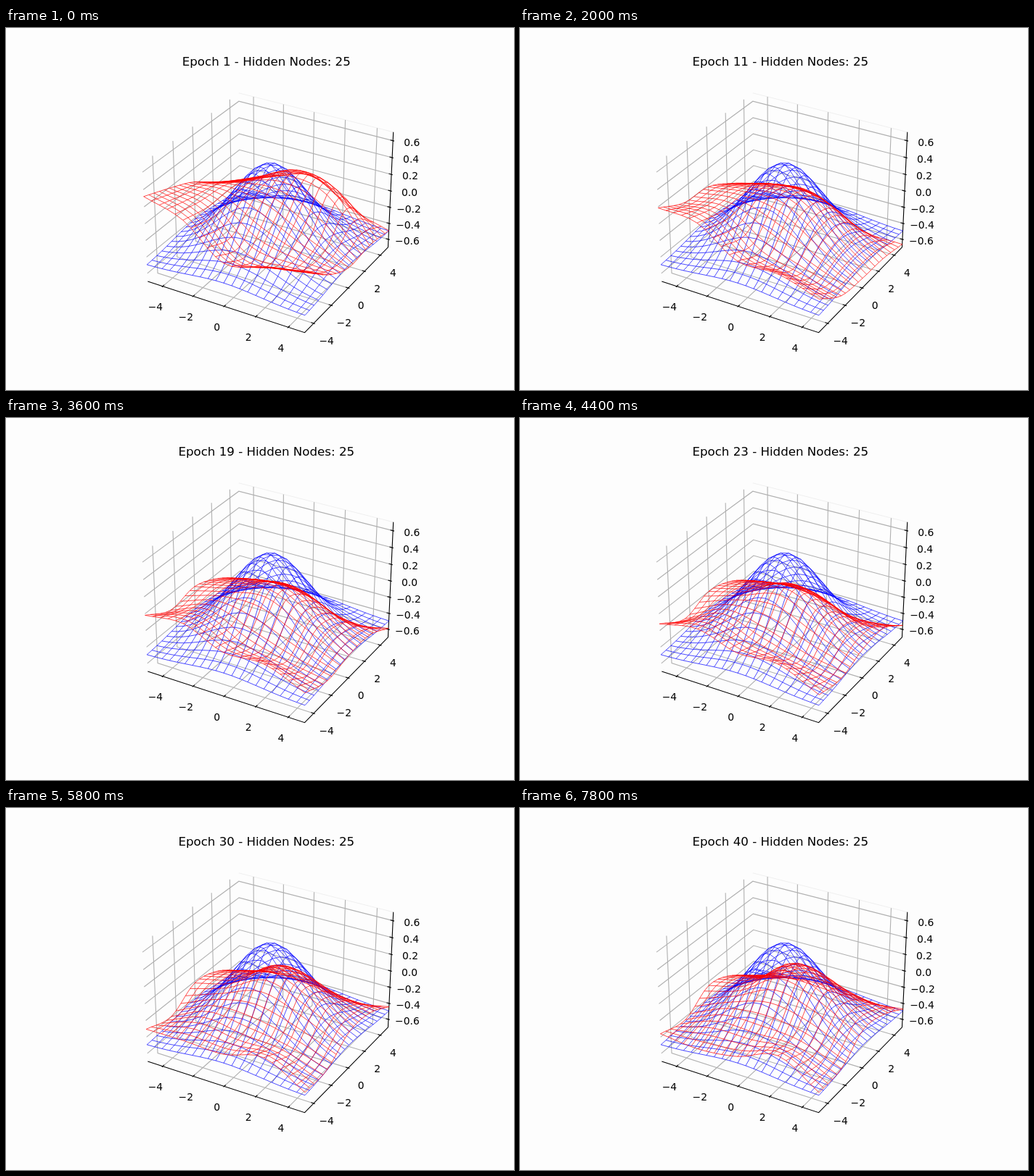
Recreate the animation shown at these times as an HTML page with a canvas. Size 700x500 px, loop 8 s.

```html
<!DOCTYPE html>
<html lang="en">
<head>
<meta charset="utf-8">
<title>Surface fit</title>
<style>
  html, body { margin: 0; width: 100%; height: 100%; overflow: hidden; background: #fdfdfd; }
  canvas { display: block; width: 700px; height: 500px; }
</style>
</head>
<body>
<canvas id="stage" width="700" height="500"></canvas>
<script>
const ctx = document.getElementById('stage').getContext('2d');
const EPOCH_MS = 200, EPOCHS = 40;
const LIM = 5, ZLIM = 0.7, CELLS = 20;
const FONT = '"DejaVu Sans", sans-serif';

// Fitted surface heights on a 5 x 5 lattice: rows y = -5..5, columns x = -5..5.
const keys = [
  { epoch: 1, heights: [
    [.32, .18, -.18, -.08, .02], [.19, .1, -.33, -.33, -.28], [.04, .1, 0, -.25, -.45],
    [-.2, 0, .2, .12, -.43], [-.41, -.21, -.08, -.35, -.49]] },
  { epoch: 7, heights: [
    [.29, .21, -.15, -.16, -.28], [.12, .1, -.3, -.43, -.56], [.04, .09, .02, -.32, -.66],
    [-.17, -.05, 0, -.28, -.68], [-.4, -.29, -.36, -.62, -.7]] },
  { epoch: 23, heights: [
    [-.12, -.04, -.18, -.16, -.37], [-.3, -.1, -.24, -.37, -.44], [-.2, -.07, .11, -.1, -.34],
    [-.3, -.19, -.13, -.3, -.34], [-.52, -.46, -.53, -.69, -.55]] },
  { epoch: 34, heights: [
    [-.41, -.45, -.39, -.23, -.51], [-.45, -.25, -.24, -.28, -.46], [-.23, -.1, .22, .07, -.21],
    [-.3, -.16, .08, -.08, -.24], [-.53, -.4, -.41, -.43, -.38]] }
];
// In the last epochs the surface tilts: the front rises, the back sinks.
keys.push({
  epoch: EPOCHS,
  heights: keys[keys.length - 1].heights.map((row, j) => row.map(z => z + 0.05 - 0.035 * j))
});

const mix = (a, b, t) => a + (b - a) * t;

// Perspective camera: elevation 30, azimuth -60, distance 10.
function project(x, y, z) {
  const X = x * 0.119048, Y = y * 0.119048, Z = z * 0.637755;
  const depth = 10 - (0.4330 * X - 0.75 * Y + 0.5 * Z);
  const scale = 2081.08 / depth;
  return {
    x: 363.95 + scale * (0.8660 * X + 0.5 * Y),
    y: 247.3 - scale * (-0.25 * X + 0.4330 * Y + 0.8660 * Z),
    depth
  };
}

// Catmull-Rom through evenly spaced values, u from 0 to 1.
function spline(v, u) {
  const last = v.length - 1;
  const i = Math.min(Math.floor(u * last), last - 1), t = u * last - i;
  const p1 = v[i], p2 = v[i + 1];
  const p0 = i > 0 ? v[i - 1] : 2 * p1 - p2;
  const p3 = i + 2 <= last ? v[i + 2] : 2 * p2 - p1;
  return p1 + t / 2 * (p2 - p0 + t * (2 * p0 - 5 * p1 + 4 * p2 - p3 + t * (3 * (p1 - p2) + p3 - p0)));
}

function heightsAt(epoch) {
  const k = Math.max(1, keys.findIndex(key => key.epoch >= epoch));
  const a = keys[k - 1], b = keys[k];
  const t = (epoch - a.epoch) / (b.epoch - a.epoch);
  return a.heights.map((row, j) => row.map((z, i) => mix(z, b.heights[j][i], t)));
}

function makeMesh(color, height) {
  const rows = [];
  let nearest = Infinity;
  for (let j = 0; j <= CELLS; j++) {
    rows.push([]);
    for (let i = 0; i <= CELLS; i++) {
      const x = mix(-LIM, LIM, i / CELLS), y = mix(-LIM, LIM, j / CELLS);
      const p = project(x, y, height(x, y));
      nearest = Math.min(nearest, p.depth);
      rows[j].push(p);
    }
  }
  return { color, rows, nearest };
}

function polyline(points, color, width) {
  ctx.beginPath();
  points.forEach(p => ctx.lineTo(p.x, p.y));
  ctx.strokeStyle = color;
  ctx.lineWidth = width;
  ctx.stroke();
}

const line3d = (points, color, width = 1.11) =>
  polyline(points.map(p => project(...p)), color, width);

function drawMesh({ rows, color }) {
  rows.forEach(row => polyline(row, color, 0.7));
  rows[0].forEach((_, i) => polyline(rows.map(row => row[i]), color, 0.7));
}

function text(string, x, y, size) {
  ctx.font = `${size}px ${FONT}`;
  ctx.textAlign = 'center';
  ctx.fillStyle = '#000';
  ctx.fillText(string, x, y);
}

function tick(label, point, axis, dx, dy) {
  // Ticks reach a little further inside the box than outside.
  const ends = [0.08, -0.16].map(d => {
    const end = [...point];
    end[axis] += Math.sign(point[axis]) * d;
    return end;
  });
  line3d(ends, '#000');
  const p = project(...point);
  text(label.replace('-', '\u2212'), p.x + dx, p.y + dy + 5, 13.89);
}

function drawAxes() {
  const L = LIM, Z = ZLIM, grid = '#b0b0b0';
  const steps = [-4, -2, 0, 2, 4];
  const zSteps = Array.from({ length: 7 }, (_, n) => (n - 3) / 5);
  line3d([[-L, L, Z], [L, L, Z]], '#f0f0f0');

  for (const v of steps) {
    line3d([[v, -L, -Z], [v, L, -Z], [v, L, Z]], grid);
    line3d([[L, v, -Z], [-L, v, -Z], [-L, v, Z]], grid);
  }
  for (const z of zSteps) line3d([[-L, -L, z], [-L, L, z], [L, L, z]], grid);

  line3d([[-L, -L, -Z], [L, -L, -Z], [L, L, -Z], [L, L, Z]], '#000');

  for (const v of steps) {
    tick(String(v), [v, -L, -Z], 1, -10, 28.4);
    tick(String(v), [L, v, -Z], 0, 17.6, 24.2);
  }
  for (const z of zSteps) tick(z.toFixed(1), [L, L, z], 0, 26, 2);
}

const goal = makeMesh('#00f', (x, y) => Math.exp(-(x * x + y * y) / 10) - 0.5);

function draw(epoch) {
  ctx.fillStyle = '#fdfdfd';
  ctx.fillRect(0, 0, 700, 500);
  drawAxes();
  const lattice = heightsAt(epoch);
  const unit = v => (v + LIM) / (2 * LIM);
  const fit = makeMesh('#f00', (x, y) => spline(lattice.map(row => spline(row, unit(x))), unit(y)));
  // The mesh with the nearest point goes on top.
  [goal, fit].sort((a, b) => b.nearest - a.nearest).forEach(drawMesh);
  text(`Epoch ${epoch} - Hidden Nodes: 25`, 358.75, 52, 16.67);
}

const start = performance.now();
function frame() {
  const elapsed = performance.now() - start;
  draw(Math.floor(elapsed / EPOCH_MS) % EPOCHS + 1);
  requestAnimationFrame(frame);
}
frame();
</script>
</body>
</html>
```
